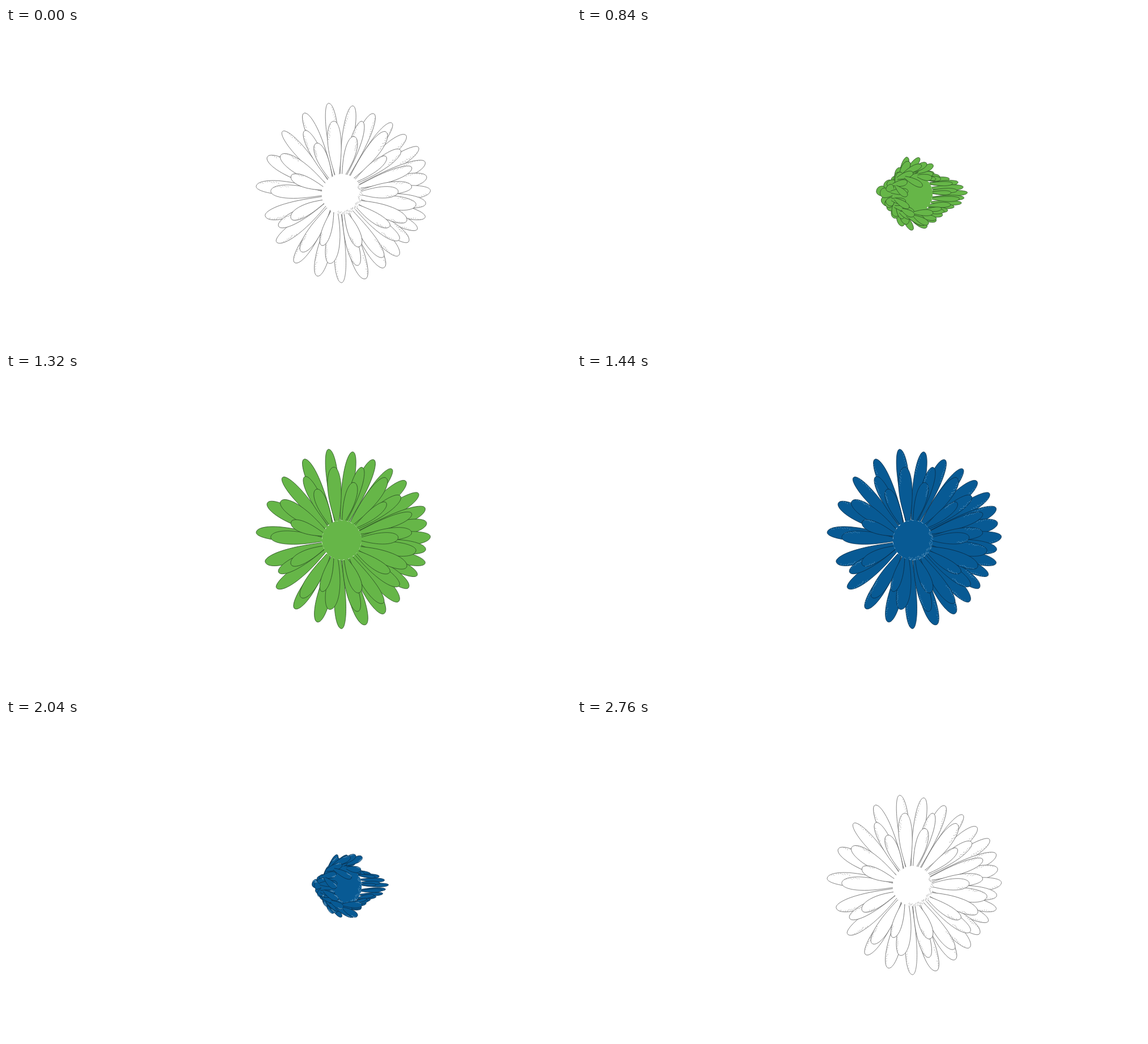
Recreate the animation shown at these times as an HTML page with a canvas. Size 998 px wide and 561 px high, loop 2880 ms.

```html
<!DOCTYPE html>
<html lang="en">
<head>
<meta charset="utf-8">
<title>Blooming flower</title>
<style>
html, body { margin: 0; width: 100%; height: 100%; overflow: hidden; background: #fff; }
canvas { display: block; }
</style>
</head>
<body>
<canvas width="998" height="561"></canvas>
<script>
const canvas = document.querySelector('canvas');
const ctx = canvas.getContext('2d');
const CX = 593, CY = 293, RADIUS = 35, STEP = 120;
const { PI, sin, cos, atan2, hypot, sqrt, floor } = Math;

// How far the flower reaches from its centre, from fully open to bud.
const poses = [
  { left: 152, right: 157, top: 164, bottom: 158 },
  { left: 134, right: 156, top: 144, bottom: 132 },
  { left: 115, right: 148, top: 129, bottom: 129 },
  { left: 104, right: 113, top: 101, bottom: 93 },
  { left: 65, right: 97, top: 69, bottom: 64 },
  { left: 53, right: 83, top: 59, bottom: 55 }
];

// Petal rings from back to front; crowd packs the petals towards the right.
const rings = [
  { count: 25, start: -119, length: 1, width: 23, crowd: .4 },
  { count: 17, start: -136, length: .8, width: 22, crowd: .35 },
  { count: 9, start: -123, length: .55, width: 19, crowd: .1 }
];

const white = { fill: '#fff', line: '#6a6a6a', hatch: '#a8a8a8' };
const green = { fill: '#66b648', line: '#2c5124' };
const blue = { fill: '#085a94', line: '#0a2e4a', hatch: '#5b93bb' };
const phases = [white, green, blue, white];

const noise = n => {
  const v = sin(n * 127.1 + 3.7) * 43758.5453;
  return v - floor(v);
};

const onDisc = (angle, r = RADIUS) => [CX + r * cos(angle), CY + r * sin(angle)];

function tick(x, y, dx, dy) {
  ctx.moveTo(x, y);
  ctx.lineTo(x + dx, y + dy);
}

function petal([bx, by], [tx, ty], w, seed, style) {
  const len = hypot(tx - bx, ty - by);
  const a = w * (.42 + .16 * noise(seed)), b = w - a;
  ctx.save();
  ctx.translate(bx, by);
  ctx.rotate(atan2(ty - by, tx - bx));
  ctx.beginPath();
  ctx.moveTo(0, -w * .16);
  ctx.bezierCurveTo(len * .2, -a * .65, len * .4, -a, len * .64, -a);
  ctx.bezierCurveTo(len * .85, -a, len, -a * .6, len, 0);
  ctx.bezierCurveTo(len, b * .6, len * .85, b, len * .64, b);
  ctx.bezierCurveTo(len * .4, b, len * .2, b * .65, 0, w * .16);
  ctx.fill();
  ctx.stroke();
  if (style.hatch && w > 10) {
    const side = noise(seed + 9) < .5 ? -a : b;
    ctx.strokeStyle = style.hatch;
    ctx.beginPath();
    for (let i = 0; i < 9; i++) {
      const u = .66 + i * .034, reach = side * sqrt(1 - ((u - .6) / .42) ** 2);
      tick(len * u, reach * (.6 + .25 * noise(seed + i)), 1 + 2 * noise(i), side * .14);
    }
    ctx.stroke();
  }
  ctx.restore();
}

function drawRing(ring, index, pose, closed, style) {
  const share = 1 - closed * .55;
  for (let i = 0; i < ring.count; i++) {
    const seed = index * 40 + i;
    const even = ring.start * PI / 180 + i * 2 * PI / ring.count;
    const angle = even - ring.crowd * sin(even);
    const c = cos(angle), s = sin(angle);
    // Diagonal petals fold first, the upper ones most.
    const fold = 1 - closed * (.3 - .15 * s) * sin(2 * angle) ** 2;
    const size = fold * (1 - .08 * noise(seed));
    const reach = extent => RADIUS + (extent * size - RADIUS) * ring.length;
    const tip = [
      CX + c * reach(c < 0 ? pose.left : pose.right),
      CY + s * reach(s < 0 ? pose.top : pose.bottom)
    ];
    const base = onDisc(angle + (.12 + .6 * closed) * s);
    const width = ring.width * share * (1 - .4 * closed * c) * (.88 + .24 * noise(seed + 5));
    petal(base, tip, width, seed, style);
  }
}

// In the bud, petals of the left half fold rightwards around and over the disc.
function drawCurled(count, r, pitch, style) {
  for (let i = 0; i < count; i++) {
    const angle = PI * (1.58 - 1.1 * i / (count - 1));
    const [x, y] = onDisc(angle, r);
    const turn = pitch(angle, i), len = 24 + 14 * noise(i + r);
    petal([x, y], [x + len * cos(turn), y + len * sin(turn)], 11, i + r, style);
  }
}

function disc(style, outlined) {
  ctx.beginPath();
  for (let i = 0; i < 60; i++) {
    ctx.lineTo(...onDisc(i * PI / 30, RADIUS + sin(i * 2.6) * .7));
  }
  ctx.closePath();
  ctx.fill();
  if (outlined) ctx.stroke();
  if (!style.hatch) return;
  ctx.strokeStyle = style.hatch;
  ctx.beginPath();
  for (let i = 0; i < 42; i++) {
    const angle = -.5 + i * .055;
    tick(...onDisc(angle, RADIUS - 1 - 5 * noise(i)), 3 * cos(angle + .5), 3 * sin(angle + .5));
  }
  ctx.stroke();
}

function draw(level, style) {
  const closed = level / 5;
  const reset = () => {
    ctx.fillStyle = style.fill;
    ctx.strokeStyle = style.line;
    ctx.lineWidth = .8;
  };
  ctx.clearRect(0, 0, canvas.width, canvas.height);
  reset();
  rings.forEach((ring, i) => drawRing(ring, i, poses[level], closed, style));
  disc(style, level > 0 && level < 4);
  if (level < 4) return;
  reset();
  drawCurled(11, RADIUS + 4, angle => .5 * sin(angle), style);
  drawCurled(6, RADIUS - 2, (angle, i) => .9 * noise(i), style);
}

let shown = -1;
function frame(now) {
  const step = floor(now / STEP) % 24;
  if (step !== shown) {
    shown = step;
    const beat = step % 12;
    draw(beat < 6 ? beat : 11 - beat, phases[floor(step / 6)]);
  }
  requestAnimationFrame(frame);
}
frame(0);
</script>
</body>
</html>
```
